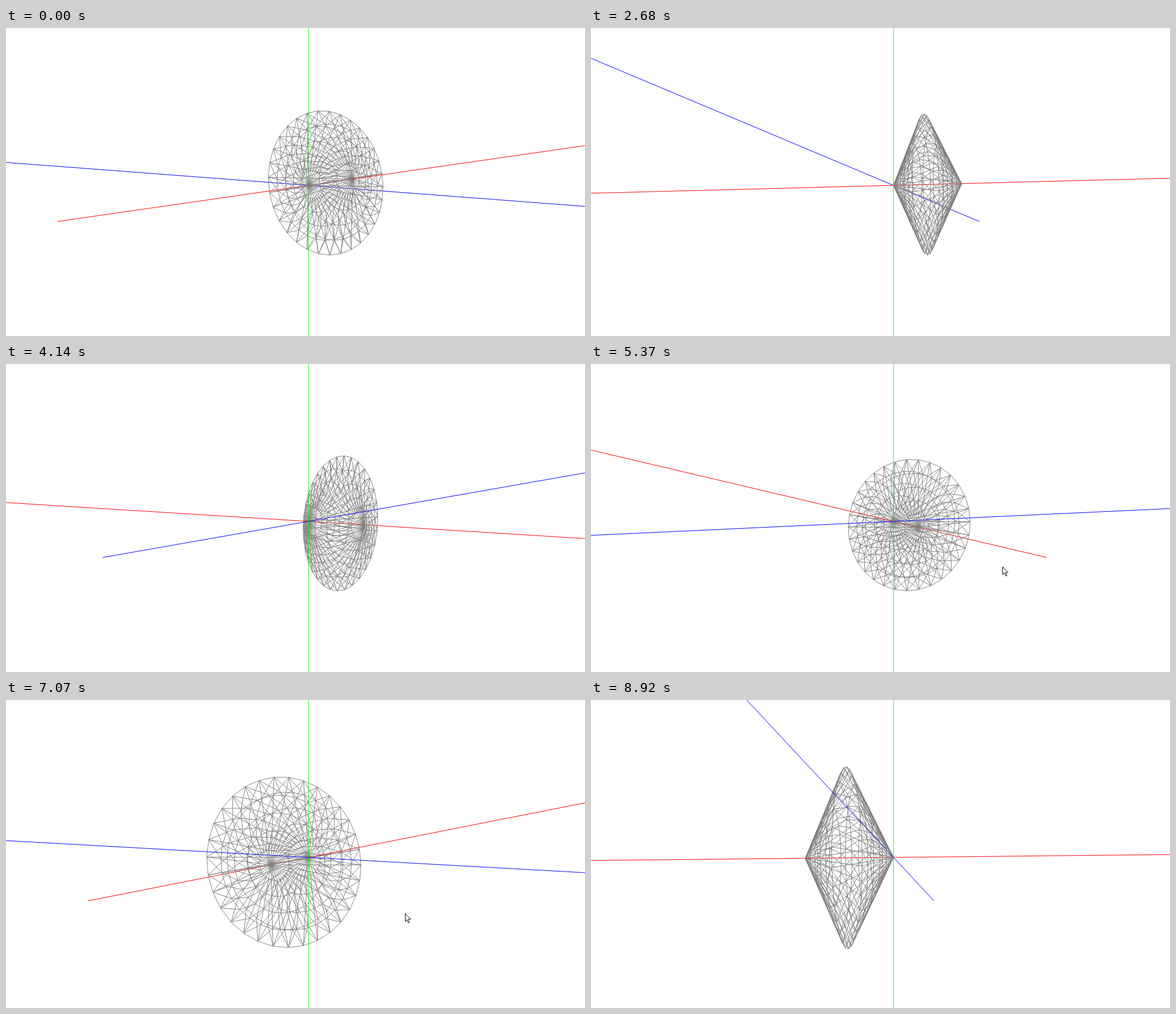
These frames come from a looping animation (1026x546 px, 9230 ms). An HTML page with a canvas:

```html
<!DOCTYPE html>
<html>
<head>
<meta charset="utf-8">
<style>
html, body { margin: 0; width: 100%; height: 100%; overflow: hidden; background: #fff; }
canvas { display: block; }
</style>
</head>
<body>
<canvas id="stage" width="1026" height="546"></canvas>
<script>
const ctx = document.getElementById('stage').getContext('2d');
const LOOP = 9230, STEP = 76.8;
const CX = 536, CY = 279, FOCAL = 1131, NEAR = 0.1, FAR = 20;
const RAD = Math.PI / 180, SIN = Math.sin(6 * RAD), COS = Math.cos(6 * RAD);
const LENGTH = 0.99, RINGS = 10, SIDES = 32, REACH = 60;

// Step number, pointer x, pointer y
const path = [[45, 700, 409], [50, 730, 358], [73, 707, 378], [85, 885, 456], [92, 975, 560]];

let dist, ca, sa;

// The turn advances in even steps, with one short rest
function stepAt(t) {
  if (t < 1450) return 0;
  if (t < 4370) return Math.min(37, 1 + Math.floor((t - 1450) / STEP));
  return Math.min(97, 38 + Math.floor((t - 4370) / STEP));
}

// Coordinates along the red, blue and green axes
function project(r, b, g) {
  const x = r * ca - b * sa, z = r * sa + b * ca;
  const k = FOCAL / (dist + z * COS + g * SIN);
  return [CX + x * k, CY - (g * COS - z * SIN) * k];
}

function line(p, q) {
  ctx.moveTo(...p);
  ctx.lineTo(...q);
}

function axis([r, b, g], color, from = -REACH, to = REACH) {
  const slope = (r * sa + b * ca) * COS + g * SIN;
  const ends = [(NEAR - dist) / slope, (FAR - dist) / slope].sort((m, n) => m - n);
  const lo = Math.max(from, ends[0]), hi = Math.min(to, ends[1]);
  if (lo >= hi) return;
  ctx.beginPath();
  line(project(r * lo, b * lo, g * lo), project(r * hi, b * hi, g * hi));
  ctx.strokeStyle = color;
  ctx.stroke();
}

const redAxis = (from, to) => axis([1, 0, 0], '#f00', from, to);

function crossAxes() {
  axis([0, 1, 0], '#00f');
  axis([0, 0, 1], '#0f0');
}

// Double cone, triangulated
function mesh() {
  const vertex = (j, i) => {
    const radius = 1 - Math.abs(2 * j / RINGS - 1), a = i / SIDES * 2 * Math.PI;
    return project(LENGTH * j / RINGS, radius * Math.sin(a), radius * Math.cos(a));
  };
  ctx.beginPath();
  for (let j = 0; j < RINGS; j++) {
    for (let i = 0; i < SIDES; i++) {
      const p = vertex(j, i);
      line(p, vertex(j + 1, i));
      if (j > 0) line(p, vertex(j, i + 1));
      if (j > 0 && j < RINGS - 1) line(p, vertex(j + 1, i + 1));
    }
  }
  ctx.strokeStyle = '#808080';
  ctx.stroke();
}

function pointer(k) {
  const i = path.findIndex(p => p[0] > k);
  if (i < 1) return;
  const [k0, x0, y0] = path[i - 1], [k1, x1, y1] = path[i];
  const u = (k - k0) / (k1 - k0);
  ctx.save();
  ctx.translate(Math.round(x0 + (x1 - x0) * u) + 0.5, Math.round(y0 + (y1 - y0) * u) + 0.5);
  const arrow = new Path2D('M0 0V14L3 11L5.5 16.5L7.5 15.5L5.2 10.3L9.5 10Z');
  ctx.fillStyle = '#fff';
  ctx.fill(arrow);
  ctx.strokeStyle = '#000';
  ctx.stroke(arrow);
  ctx.restore();
}

function draw(k) {
  const angle = (-54 + 2.355 * k) * RAD;
  ca = Math.cos(angle);
  sa = Math.sin(angle);
  dist = 9.23 - 2.2 * Math.min(1, Math.max(0, (k - 59) / 8));
  ctx.fillStyle = '#fff';
  ctx.fillRect(0, 0, 1026, 546);

  // The solid lies behind the cross axes when it points away
  if (sa > 0) {
    redAxis(0, REACH);
    mesh();
    redAxis(-REACH, 0);
    crossAxes();
  } else {
    crossAxes();
    redAxis(-REACH, LENGTH);
    mesh();
    redAxis(LENGTH, REACH);
  }
  pointer(k);
}

const begin = performance.now();
function tick() {
  draw(stepAt((performance.now() - begin) % LOOP));
  requestAnimationFrame(tick);
}
tick();
</script>
</body>
</html>
```
